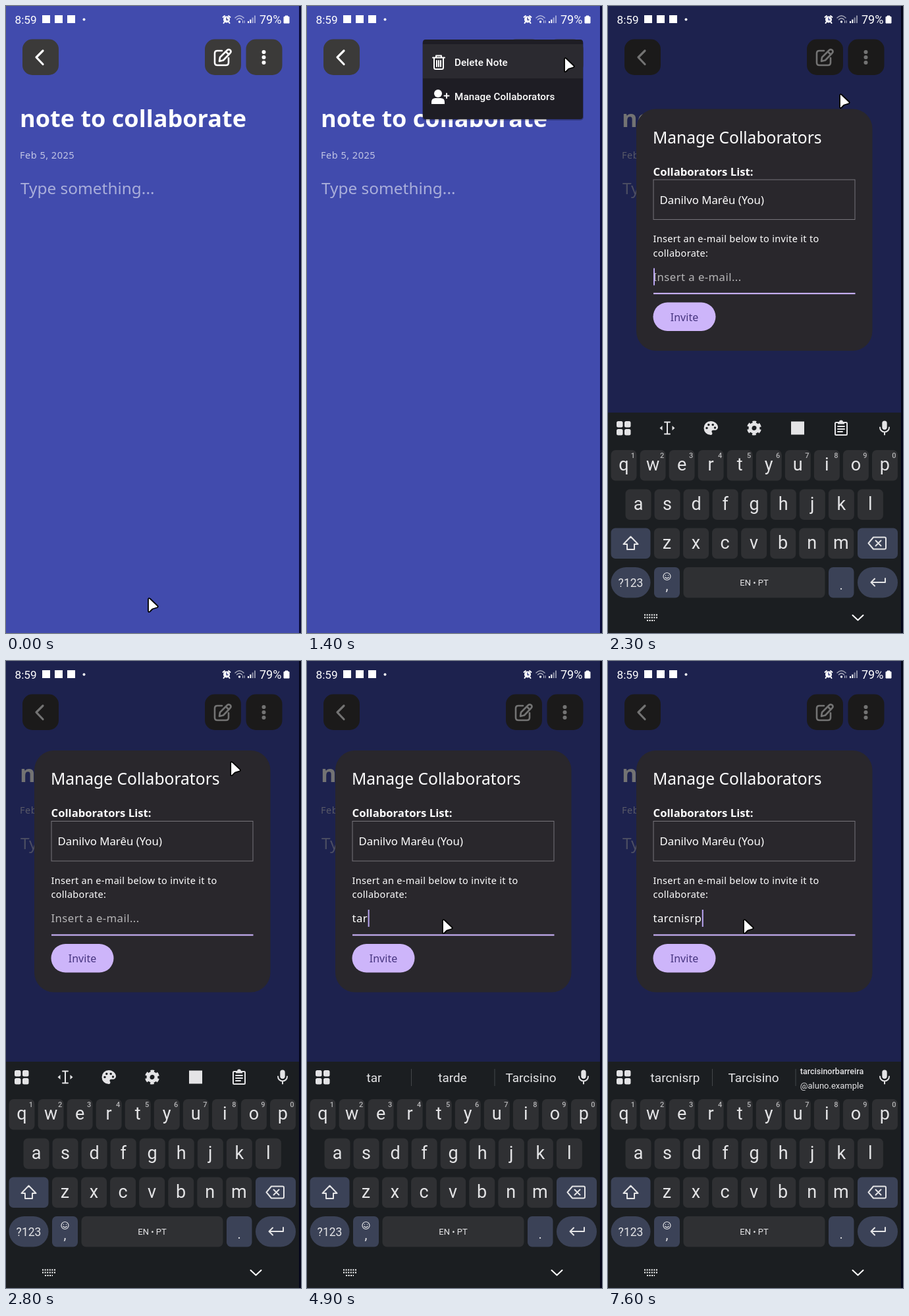
These frames come from a looping animation (448 px wide and 953 px high, 8000 ms). An HTML page:

```html
<!DOCTYPE html>
<html lang="en">
<head>
<meta charset="utf-8">
<title>Manage collaborators</title>
<style>
html, body { margin: 0; height: 100%; overflow: hidden; background: #414bad; }
svg { display: block; width: 100vw; height: 100vh; }
text { font-family: "Noto Sans", sans-serif; fill: #fff; white-space: pre; }
.ui text { font-family: Roboto, sans-serif; }
.line { fill: none; stroke: #fff; stroke-linecap: round; stroke-linejoin: round; }
.mid { text-anchor: middle; }
.field { font-size: 16.7px; letter-spacing: .45px; }
.hint { font-size: 14.5px; letter-spacing: .3px; }
.item { font-size: 15.2px; font-weight: 500; letter-spacing: .1px; }
#keyboard text { fill: #e4e4e6; }
#keyboard .line { stroke: #e4e4e6; stroke-width: 2; }
#tools { fill: #e4e4e6; }
#words text { font-size: 19px; }
#keyboard .num { font-size: 11px; fill: #b4b4b6; font-weight: 500; }
</style>
</head>
<body>
<svg viewBox="0 0 448 953" preserveAspectRatio="none">
  <rect width="448" height="953" fill="#414bad"/>
  <rect x="445" width="3" height="953" fill="#0a0b3a"/>

  <g id="page">
    <g fill="#3b3a39">
      <rect x="25" y="50.500" width="55" height="54.500" rx="15"/>
      <rect x="302" y="50.500" width="55" height="54.500" rx="15"/>
      <rect x="364.500" y="50.500" width="55" height="54.500" rx="15"/>
    </g>
    <path class="line" stroke-width="3.2" d="M56 68L46 78L56 88.500"/>
    <path class="line" stroke-width="2.6" d="M328 68H321Q317 68 317 72V86Q317 90 321 90H334Q338 90 338 86V79M324 84L325 78L336 67Q338.500 65 341 67.500Q342.500 70 340 72L330 82.500ZM334 69.500L338 73.500"/>
    <g fill="#fff"><circle cx="391.500" cy="70" r="3"/><circle cx="391.500" cy="78" r="3"/><circle cx="391.500" cy="86" r="3"/></g>
    <text x="21" y="184" font-size="36.1" font-weight="700">note to collaborate</text>
    <text x="21" y="232" font-size="14.5" letter-spacing=".5" opacity=".68">Feb 5, 2025</text>
    <text x="22" y="286" font-size="24.4" opacity=".55">Type something...</text>
  </g>

  <g id="menu" class="ui">
    <rect x="175" y="52" width="245" height="122" rx="5" opacity=".25"/>
    <rect x="176" y="51" width="243" height="121" rx="4" fill="#1e1d24"/>
    <rect id="hover" x="176" width="243" height="52"/>
    <path class="line" stroke-width="2" d="M191 78.500H209M196 78V75.500H204V78M193 79V93.500Q193 96 195.500 96H204.500Q207 96 207 93.500V79M197 83V92M200 83V92M203 83V92"/>
    <text class="item" x="224" y="90.500">Delete Note</text>
    <circle cx="199" cy="133" r="6" fill="#fff"/>
    <path d="M189 149V146Q189 140 195 140H203Q209 140 209 146V149Z" fill="#fff"/>
    <path class="line" stroke-width="2" d="M208.500 136.500H215.500M212 133V140"/>
    <text class="item" id="manage" x="224" y="142.500">Manage Collaborators</text>
  </g>

  <rect id="dim" width="448" height="953"/>

  <g id="dialog">
    <rect x="43" width="358.500" height="367.500" rx="30" fill="#29272c"/>
    <text x="68" y="52" font-size="24.6">Manage Collaborators</text>
    <text x="68.500" y="101" font-size="16.7" font-weight="700">Collaborators List:</text>
    <rect x="69" y="107.500" width="306" height="60.500" fill="none" stroke="#77757b"/>
    <text x="78.500" y="144" font-size="16.8">Danilvo Marêu (You)</text>
    <text class="hint" x="68.500" y="202.500">Insert an e-mail below to invite it to</text>
    <text class="hint" x="68.500" y="224">collaborate:</text>
    <text class="field" id="prompt" x="68.500" y="261" opacity=".66">Insert a e-mail...</text>
    <text class="field" id="typed" x="68.500" y="261"></text>
    <rect id="caret" y="242" width="2" height="26" fill="#b9a5f2"/>
    <rect x="69" y="279.400" width="306.500" height="2.200" fill="#c5aef3"/>
    <rect x="68.500" y="294" width="95" height="43.500" rx="21.750" fill="#cdb5fa"/>
    <text class="mid" x="116" y="322" font-size="16" style="fill:#46347f">Invite</text>
  </g>

  <g id="keyboard" class="ui">
    <rect width="445" height="344" fill="#1b1e21"/>
    <g fill="#e4e4e6">
      <rect x="13" y="13" width="9.500" height="9.500" rx="2.500"/><rect x="25" y="13" width="9.500" height="9.500" rx="2.500"/>
      <rect x="13" y="25" width="9.500" height="9.500" rx="2.500"/><rect x="25" y="25" width="9.500" height="9.500" rx="2.500"/>
    </g>
    <g transform="translate(420 23.500)">
      <rect x="-3.700" y="-11" width="7.400" height="13.500" rx="3.700" fill="#e4e4e6"/>
      <path class="line" d="M-7-1A7 7 0 0 0 7-1M0 6V10"/>
    </g>
    <g id="tools">
      <g transform="translate(90 23.500)">
        <path class="line" d="M-4-9H4M0-9V9M-4 9H4"/>
        <path d="M-7.500-3.500V3.500L-11.500 0ZM7.500-3.500V3.500L11.500 0Z"/>
      </g>
      <g transform="translate(156 23.500)">
        <path d="M0-10.500A10.500 10.500 0 0 0 0 10.500C2.500 10.500 3 8 1.800 6.500C.8 4.900 1.800 3.300 3.800 3.300H6.400C8.900 3.300 11 1.300 11-1.300C11-6 6-10.500 0-10.500Z"/>
        <g fill="#1b1e21"><circle cx="-6" r="1.700"/><circle cx="-3.200" cy="-5" r="1.700"/><circle cx="3.200" cy="-5" r="1.700"/><circle cx="6.500" cy="-.5" r="1.700"/></g>
      </g>
      <g transform="translate(222 23.500) rotate(13)" fill="none" stroke="#e4e4e6">
        <circle r="6" stroke-width="5"/><circle r="9" stroke-width="4" stroke-dasharray="5.400 4.025"/>
      </g>
      <rect x="278" y="13.500" width="20" height="20"/>
      <g transform="translate(354 23.500)">
        <rect class="line" x="-9" y="-8.500" width="18" height="19" rx="1.500"/>
        <path d="M-5-9H-3A3 3 0 0 1 3-9H5V-6H-5Z"/>
        <path class="line" d="M-5-2.500H5M-5 1.500H5M-5 5.500H2"/>
      </g>
    </g>
    <g id="words" class="mid">
      <path d="M158.500 11V37M285 11V37" stroke="#43464a"/>
      <text id="word0" x="102" y="31"></text>
      <text id="word1" x="221" y="31"></text>
      <text id="word2" x="340" y="31"></text>
      <g id="email">
        <text x="340" y="18.500" style="font-size:12.500px;font-weight:500">tarcisinorbarreira</text>
        <text x="340" y="41" style="font-size:13px">@aluno.example</text>
      </g>
    </g>
    <g id="keys" class="mid"></g>
    <path class="line" transform="translate(34.500 199)" d="M0-10.500L11 1H5.500V9H-5.500V1H-11Z"/>
    <path class="line" transform="translate(409 198.500)" d="M-13.500 0L-6-9H11Q13-9 13-7V7Q13 9 11 9H-6ZM-2.500-4L5.500 4M5.500-4L-2.500 4"/>
    <path class="line" transform="translate(410 257)" d="M11-5V1H-10M-5-4.500L-10.500 1L-5 6.500"/>
    <g transform="translate(89.500 249)">
      <circle class="line" r="5.500" style="stroke-width:1.200"/>
      <path class="line" d="M-2-1.500V-1.400M2-1.500V-1.400M-2.700 1.500Q0 4 2.700 1.500" style="stroke-width:1.300"/>
    </g>
  </g>
  <g id="nav" class="line" stroke-width="2">
    <path d="M55 925.500H75M55 929.500H75M59 934H71" stroke-dasharray="2 1.600" style="stroke-linecap:butt"/>
    <path d="M371.500 926L379.500 933.500L387.500 926"/>
  </g>

  <g id="status" class="ui" fill="#fff">
    <text x="13.500" y="26.500" font-size="17.200">8:59</text>
    <rect x="55" y="14" width="12" height="12"/><rect x="74" y="14" width="12" height="12"/><rect x="93" y="14" width="12" height="12"/>
    <circle cx="118.500" cy="20.500" r="2"/>
    <circle cx="335" cy="20.500" r="5"/>
    <path class="line" stroke-width="2" d="M329.500 17L332 15M338 15L340.500 17M331.500 24.500L330.500 26M338.500 24.500L339.500 26"/>
    <path d="M335 17.500V21H337.500" fill="none" stroke="#303880" stroke-width="1.300"/>
    <path class="line" stroke-width="1.500" opacity=".6" d="M348 18Q354.500 11.500 361 18M350.500 20.800Q354.500 16.800 358.500 20.800"/>
    <circle cx="354.500" cy="24" r="1.700"/>
    <path d="M359.500 22V26M362 22V26" stroke="#fff" opacity=".7"/>
    <rect x="367" y="23" width="2" height="3"/><rect x="370.300" y="20.500" width="2" height="5.500"/>
    <g opacity=".5"><rect x="373.600" y="17.500" width="2" height="8.500"/><rect x="377" y="14.500" width="2" height="11.500"/></g>
    <text x="385" y="26.500" font-size="18">79%</text>
    <path d="M424 15H428V16.500H430V26H422V16.500H424Z" stroke="#fff" stroke-linejoin="round"/>
  </g>

  <path id="pointer" d="M1 3V20Q1 23 3.500 21.500L7.500 17.500L14 15.500Q17 14.500 15 12.500L4 2Q1 0 1 3Z" fill="#fff" stroke="#000" stroke-width="1.800" stroke-linejoin="round"/>
</svg>
<script>
const LOOP = 8000, STEP = 100;
const el = Object.fromEntries([...document.querySelectorAll('[id]')].map(e => [e.id, e]));

// Keyboard
const PITCH = 44.05, rowY = [57, 116.5, 175.5, 235];
const key = (x, y, w, label = '', { fill = '#2f3033', r = 7, size = 27, base = 31 } = {}) =>
  `<rect x="${x}" y="${y}" width="${w}" height="46.500" rx="${r}" fill="${fill}"/>` +
  `<text x="${x + w / 2}" y="${y + base}" font-size="${size}">${label}</text>`;
const letters = (row, x0, chars) =>
  [...chars].map((c, i) => key(x0 + i * PITCH, rowY[row], 39, c)).join('');
const numbers = [...'1234567890']
  .map((n, i) => `<text class="num" x="${38 + i * PITCH}" y="68.500">${n}</text>`).join('');
const blue = '#3b4257';
el.keys.innerHTML = letters(0, 4.5, 'qwertyuiop') + numbers +
  letters(1, 26.5, 'asdfghjkl') + letters(2, 70, 'zxcvbnm') +
  key(4.5, rowY[2], 60, '', { fill: blue }) + key(379, rowY[2], 61, '', { fill: blue }) +
  key(4.5, rowY[3], 60, '?123', { fill: blue, r: 23, size: 17.5, base: 29.5 }) +
  key(70, rowY[3], 39, ',', { fill: blue, size: 20, base: 35 }) +
  key(114.5, rowY[3], 215, 'EN • PT', { size: 13, base: 28 }) +
  key(335, rowY[3], 38.5, '.', { fill: blue, size: 20, base: 34 }) +
  key(379, rowY[3], 61, '', { fill: blue, r: 23 });

// Timeline
const typing = [[0, ''], [4500, 't'], [4800, 'ta'], [4900, 'tar'], [5100, 'tarc'], [5500, 'tarci'],
  [6000, 'tarc'], [6200, 'tarcn'], [6300, 'tarcni'], [6400, 'tarcnis'], [6800, 'tarcnisr'],
  [6900, 'tarcnisro'], [7300, 'tarcnisr'], [7500, 'tarcnisrp']];
const guesses = [[0, ''], [4600, 't'], [4900, 'tar'], [5100, 'tarc'], [5600, 'tarci'], [6100, 'tarc'],
  [6300, 'tarcn'], [6400, 'tarcnis'], [6900, 'tarcnisro'], [7600, 'tarcnisrp']];
const stops = [[215, 899], [390, 78], [351, 133], [205, 392]];

const latest = (list, t) => list.findLast(([at]) => at <= t)[1];
const track = (t, ...keys) => {
  const i = keys.findIndex(([at]) => at > t);
  if (i < 0) return keys.at(-1)[1];
  if (!i) return keys[0][1];
  const [[a, u], [b, v]] = [keys[i - 1], keys[i]];
  return u + (v - u) * (t - a) / (b - a);
};
const show = (e, on) => e.style.display = on ? '' : 'none';
const moveTo = (e, x, y) => e.setAttribute('transform', `translate(${x} ${y})`);

function pointerAt(t) {
  const leg = track(t, [100, 0], [900, 1], [1400, 1], [1800, 2], [2700, 2], [3300, 3]);
  const i = Math.min(Math.floor(leg), 2), p = leg - i, ease = p * p * (3 - 2 * p);
  return stops[i].map((v, axis) => v + (stops[i + 1][axis] - v) * ease);
}

function draw(t) {
  const [px, py] = pointerAt(t);
  moveTo(el.pointer, px, py);

  const lower = py > 108, pressed = t >= 1900;
  show(el.menu, t >= 1000 && t < 2300);
  el.menu.style.opacity = track(t, [950, 0], [1100, 1], [2100, 1], [2300, 0]);
  el.menu.style.clipPath = `inset(0 0 ${track(t, [950, 85], [1250, 0])}% 0)`;
  el.hover.setAttribute('y', lower ? 111 : 58);
  el.hover.setAttribute('fill', pressed ? '#46454a' : '#2b2a30');
  el.manage.style.opacity = pressed ? .35 : 1;

  el.dim.style.opacity = track(t, [1850, 0], [2050, .55]);
  show(el.dialog, t >= 1900);
  el.dialog.style.opacity = track(t, [1850, 0], [2050, 1]);
  moveTo(el.dialog, 0, track(t, [2100, 307], [2200, 225], [2300, 156.5], [2400, 138], [2500, 136]));
  moveTo(el.keyboard, 0, track(t, [2000, 953], [2100, 818], [2200, 690], [2300, 618], [2400, 609]));
  show(el.nav, t > 2000);

  const text = latest(typing, t), guess = latest(guesses, t), full = t >= 5600;
  el.typed.textContent = text;
  show(el.prompt, !text);
  el.caret.setAttribute('x', 69 + (text && el.typed.getComputedTextLength()));
  show(el.caret, text || t % 1000 < 600);

  show(el.tools, !guess);
  show(el.words, guess);
  show(el.email, full);
  el.word0.textContent = guess;
  el.word1.textContent = full ? 'Tarcisino' : 'tarde';
  el.word2.textContent = full ? '' : t < 4900 ? 'todos' : 'Tarcisino';
}

function frame() {
  draw(Math.floor(performance.now() % LOOP / STEP) * STEP);
  requestAnimationFrame(frame);
}
frame();
</script>
</body>
</html>
```
